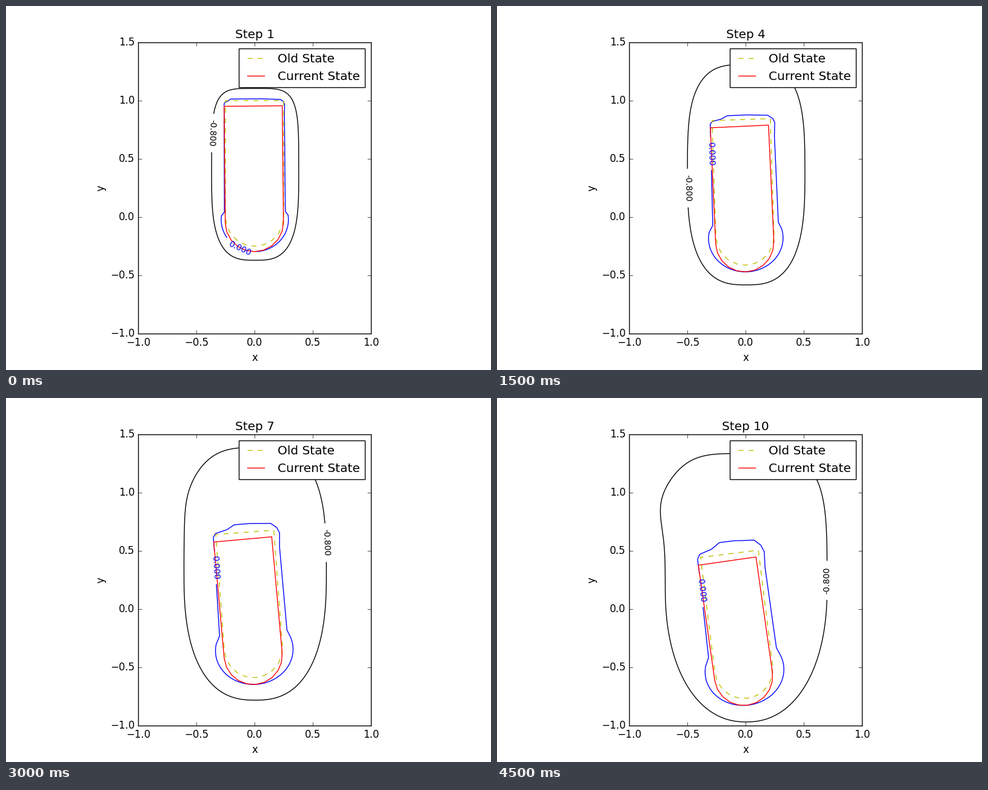
These frames come from a looping animation (800x600 px, 6.5 s). A matplotlib script:

```python
import numpy as np
import matplotlib.pyplot as plt
from matplotlib.animation import FuncAnimation

plt.style.use("classic")

STEPS, TICKS = 10, 13
SCALE, CX, CY = 192, 410, 348  # pixels per unit and pixel position of (0, 0)


def to_data(x, y):
    return (x - CX) / SCALE, (CY - y) / SCALE


def to_world(n, u, v):
    """Body frame (origin at the centre of the round end) to data coordinates."""
    a = np.radians(0.56 * n + 0.025 * n * n)
    k = n - 1
    cx, cy = -0.0017 * n, -0.0465 - 0.0575 * k - 0.00017 * k * k if n else 0
    return (cx + u * np.cos(a) - v * np.sin(a),
            cy + u * np.sin(a) + v * np.cos(a))


def body(n):
    """Peg with a round lower end after n steps."""
    arc = np.radians(np.linspace(-180, 0, 11))
    u = np.r_[0.25, 0.25, -0.25, 0.25 * np.cos(arc)]
    v = np.r_[0, 1, 1, 0.25 * np.sin(arc)]
    return to_world(n, u, v)


def half_width(n):
    return 62.5 + 9.6 * n - 0.25 * n * n


def outer(n):
    """Superellipse that grows each step and swells at its upper left."""
    top = 81.5 + 1.37 * (n - 7.3) ** 2
    bottom = 405 + 14.2 * n - 0.13 * n * n
    t = np.linspace(0, 2 * np.pi, 721)
    c, s = np.cos(t), np.sin(t)
    power = np.where(s > 0, 3 + ((n - 6) / 4) ** 2, 3.2 - 0.1 * n)
    x = np.sign(c) * np.abs(c) ** (2 / power)
    y = np.sign(s) * np.abs(s) ** (2 / power)
    swell = 0.1 * (n / 10) ** 3 * np.exp(-((y - 0.65) / 0.25) ** 2)
    x = x * (1 + swell * (x < 0))
    return to_data(411 + half_width(n) * x,
                   (top + bottom) / 2 - (bottom - top) / 2 * y)


def inner(n):
    """Outline hugging the peg, with a wider bulb around the round end."""
    s = 1 - np.exp(-n / 3.5)  # margins settle over the steps
    left, right, above = 5 * s, 13 * s, 10 + 2.3 * n
    lift, waist = 3 + 6.5 * s, 7 + 19 * s
    rx, ry = 52 + 14 * s, 51 + 6.5 * s
    neck = waist + 3 + 12 * s

    end = np.arcsin((waist - lift) / ry)
    t = np.linspace(np.pi - end, 2 * np.pi + end, 40)
    bulb = np.column_stack([3 * s + rx * np.cos(t), lift + ry * np.sin(t)])
    rise = [(48 + right, neck), (48 + right, 172),
            (48 + 1.2 * right, 192 + 0.2 * above),
            (47 + 0.95 * right, 192 + 0.55 * above),
            (44 + 5 * s, 192 + 0.85 * above)]
    fall = [(15, 192 + 0.96 * above), (42 * s - 48, 192 + 0.97 * above),
            (27 * s - 48, 192 + 0.7 * above), (5 * s - 48, 192 + 0.53 * above),
            (-48, 192 + 0.3 * above), (-48, 190), (-48 - left, neck)]
    u, v = np.vstack([bulb, rise, fall]).T / SCALE
    return to_world(n, u, v)


def resample(x, y, n=900):
    """Closed outline as n points evenly spaced along its length."""
    x, y = np.r_[x, x[0]], np.r_[y, y[0]]
    s = np.r_[0, np.cumsum(np.hypot(np.diff(x), np.diff(y)))]
    t = np.linspace(0, s[-1], n)
    return np.column_stack([np.interp(t, s, x), np.interp(t, s, y)])


def outer_anchor(n):
    heights = [209, 250, 387, 300, 297, 300, 238, 261, 285, 300]
    side = -1 if n < 7 else 1
    return to_data(411 + side * half_width(n), heights[n - 1])


def inner_anchor(n):
    if n == 1:
        return to_world(n, -0.135, -0.245)
    return to_world(n, 0.3, 0.87) if n in (8, 9) else to_world(n, -0.25, 0.78)


fig = plt.figure(figsize=(8, 6), dpi=100, facecolor="white")
ax = fig.add_subplot(111, aspect="equal")
ax.set_xlim(-1, 1)
ax.set_ylim(-1, 1.5)
ax.set_xticks(np.arange(-1, 1.1, 0.5))
ax.set_yticks(np.arange(-1, 1.6, 0.5))
ax.set_xlabel("x", labelpad=5.7)
ax.set_ylabel("y")
title = ax.set_title("Step 1")


def contour(color, label):
    line, = ax.plot([], [], color=color, solid_capstyle="butt")
    tag = ax.text(0, 0, label, color=color, size=10, ha="center", va="center")
    return line, tag


outer_art = contour("k", "-0.800")
inner_art = contour("b", "0.000")
old, = ax.plot([], [], "y--", label="Old State")
current, = ax.plot([], [], "r-", label="Current State")
ax.legend(handles=[old, current], loc="upper right", fontsize=14.5)


def draw(art, outline, anchor, gap, turn=0):
    """Draw an outline, opened at the point nearest the anchor for its label."""
    line, tag = art
    path = resample(*outline)
    i = np.argmin(np.hypot(*(path - anchor).T))
    spot = path[i]
    dx, dy = path[(i + 12) % len(path)] - path[i - 12]
    if dy > 0:
        dx, dy = -dx, -dy
    tag.set_position(spot)
    tag.set_rotation(np.degrees(np.arctan2(dy, dx)) + turn)
    near = np.hypot(*(path - spot).T) < gap / SCALE
    line.set_data(*np.where(near[:, None], np.nan, path).T)


def update(i):
    n = min(i + 1, STEPS)
    title.set_text(f"Step {n}")
    draw(outer_art, outer(n), outer_anchor(n), 31, 180 if n > 8 else 0)
    draw(inner_art, inner(n), inner_anchor(n), 27)
    old.set_data(*body(n - 1))
    current.set_data(*body(n))
    return [title, old, current, *outer_art, *inner_art]


anim = FuncAnimation(fig, update, frames=TICKS, interval=500, repeat=True,
                     repeat_delay=0, blit=False)
plt.show()
```
